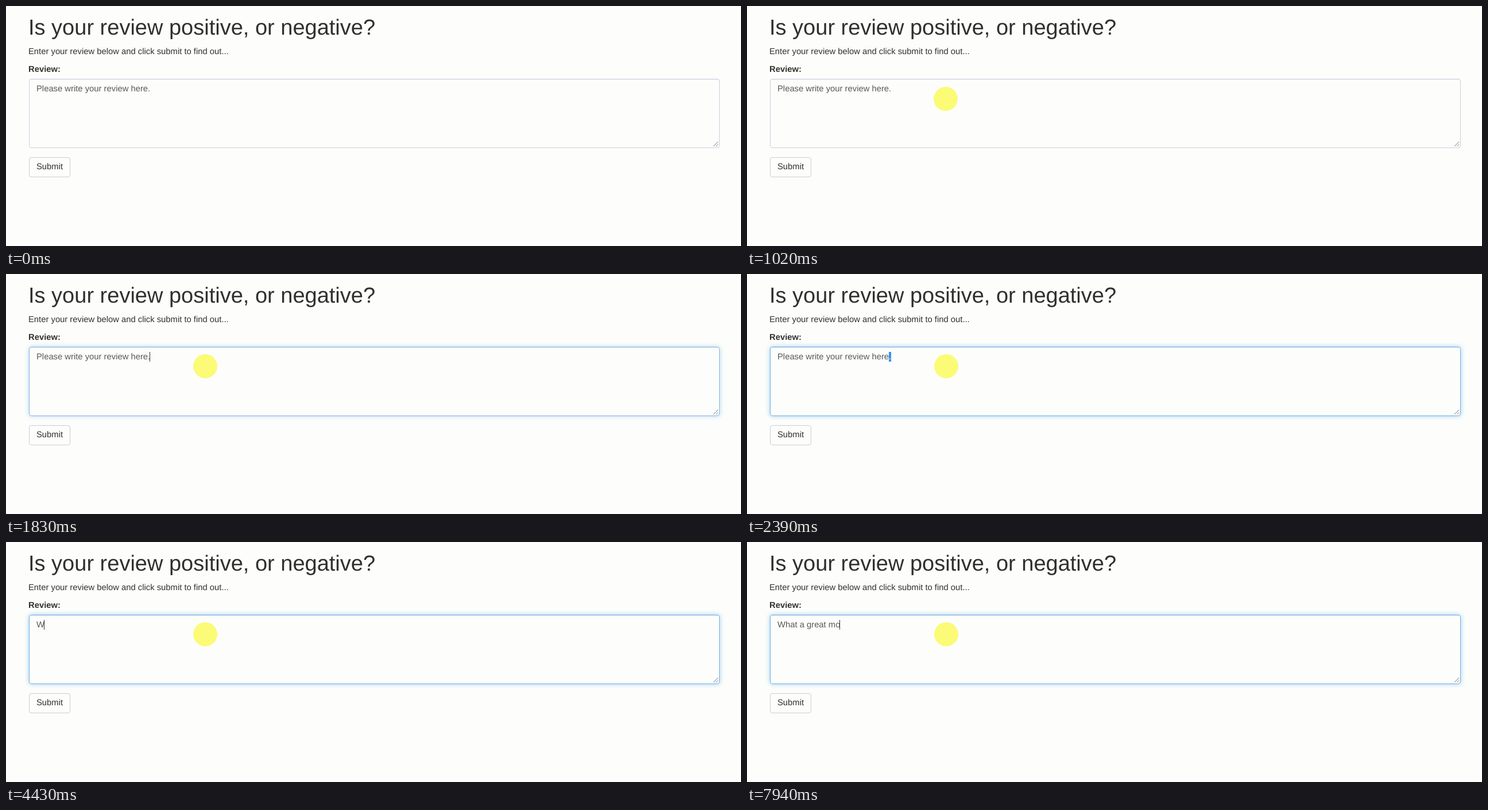
These frames come from a looping animation (1280x419 px, 8000 ms). An HTML page:

```html
<!DOCTYPE html>
<html lang="en">
<head>
<meta charset="utf-8">
<title>Review form</title>
<style>
  html, body { margin: 0; width: 100%; height: 100%; overflow: hidden; }
  body {
    position: relative;
    background: #fdfefb;
    color: #303030;
    font: 14.8px/17px "Liberation Sans", Arial, sans-serif;
    text-rendering: geometricPrecision;
  }
  body > * { position: absolute; margin: 0; box-sizing: border-box; white-space: pre; }
  h1 { left: 39px; top: 17px; font-size: 38px; line-height: 42px; font-weight: 400; }
  p { left: 39px; top: 72px; }
  label { left: 39px; top: 103px; font-weight: 700; }
  #field { left: 39.5px; top: 126.5px; width: 1203.5px; height: 121px; border: 1px solid; border-radius: 4px; }
  #entry { left: 53px; top: 136px; height: 17px; line-height: 19px; display: flex; color: #585858; }
  #selected { background: #398fec; color: #fff; }
  #caret { width: 1px; margin-left: -1px; background: #333; }
  #submit { left: 39.5px; top: 263.5px; width: 72.5px; height: 35px; border: 1px solid #cbccd6; border-radius: 4px; }
  #submit span { position: absolute; left: 12.5px; top: 8.5px; }
  #grip { left: 1230px; top: 235px; }
  #pointer { left: -21px; top: -21px; width: 42px; height: 42px; border-radius: 50%; background: #fbfb76; }
  #pointer::after { content: ""; position: absolute; left: 21px; top: 15px; width: 1px; height: 13px; background: #f6f6a0; }
</style>
</head>
<body>
<h1>Is your review positive, or negative?</h1>
<p>Enter your review below and click submit to find out...</p>
<label>Review:</label>
<div id="field"></div>
<div id="entry"><span id="plain"></span><span id="selected"></span><span id="caret"></span></div>
<svg id="grip" width="12" height="12" stroke="#777" stroke-width="1"><path d="M2 10L10 2M6.5 10L10 6.5"/></svg>
<div id="submit"><span>Submit</span></div>
<div id="pointer"></div>
<script>
const LOOP = 8000;
const PROMPT = "Please write your review here.";
const REVIEW = "What a great mo";
const $ = id => document.getElementById(id);
const [field, plain, selected, caret, pointer] =
  ["field", "plain", "selected", "caret", "pointer"].map($);

// Each state: start time, text, caret visible, index where the selection begins.
const states = [
  [0, PROMPT, false],
  [1580, PROMPT, true],
  [2090, PROMPT, false],
  [2390, PROMPT, false, PROMPT.indexOf(".")],
  [3000, PROMPT, false, PROMPT.indexOf("here")],
  [3050, PROMPT, false, PROMPT.indexOf("your")],
  [3110, PROMPT, false, 0],
  [3360, "", true],
  [3870, "", false],
  ...typed(1, 4380, 4740, 4940, 4990, 5190, 5350, 5450),
  [5910, REVIEW.slice(0, 7), false],
  ...typed(8, 6420, 6570, 6720, 6920, 7080, 7230, 7740, 7890)
];

function typed(length, ...times) {
  return times.map((time, i) => [time, REVIEW.slice(0, length + i), true]);
}

const progress = (t, from, to) => Math.min(1, Math.max(0, (t - from) / (to - from)));
const mix = (a, b, k) => a.map((v, i) => v + (b[i] - v) * k);

function drawEntry(t) {
  const [, text, caretOn, start = text.length] = states.findLast(s => s[0] <= t);
  plain.textContent = text.slice(0, start);
  selected.textContent = text.slice(start);
  caret.style.visibility = caretOn ? "visible" : "hidden";
}

function drawFocus(t) {
  const k = progress(t, 1560, 1930);
  const focus = k * k * (3 - 2 * k);
  field.style.borderColor = `rgb(${mix([203, 207, 226], [118, 174, 234], focus)})`;
  field.style.boxShadow =
    `inset 0 1px 1px rgba(0,0,0,.075), 0 0 8px rgba(102,175,233,${0.6 * focus})`;
}

function drawPointer(t) {
  const glide = 1 - (1 - progress(t, 630, 1040)) ** 3;
  const settle = progress(t, 1040, 1430);
  const [x, y] = mix(mix([280, 450], [346, 162], glide), [347, 161], settle);
  pointer.style.transform = `translate(${x}px, ${y}px)`;
}

function frame() {
  const t = performance.now() % LOOP;
  drawEntry(t);
  drawFocus(t);
  drawPointer(t);
  requestAnimationFrame(frame);
}
frame();
</script>
</body>
</html>
```
